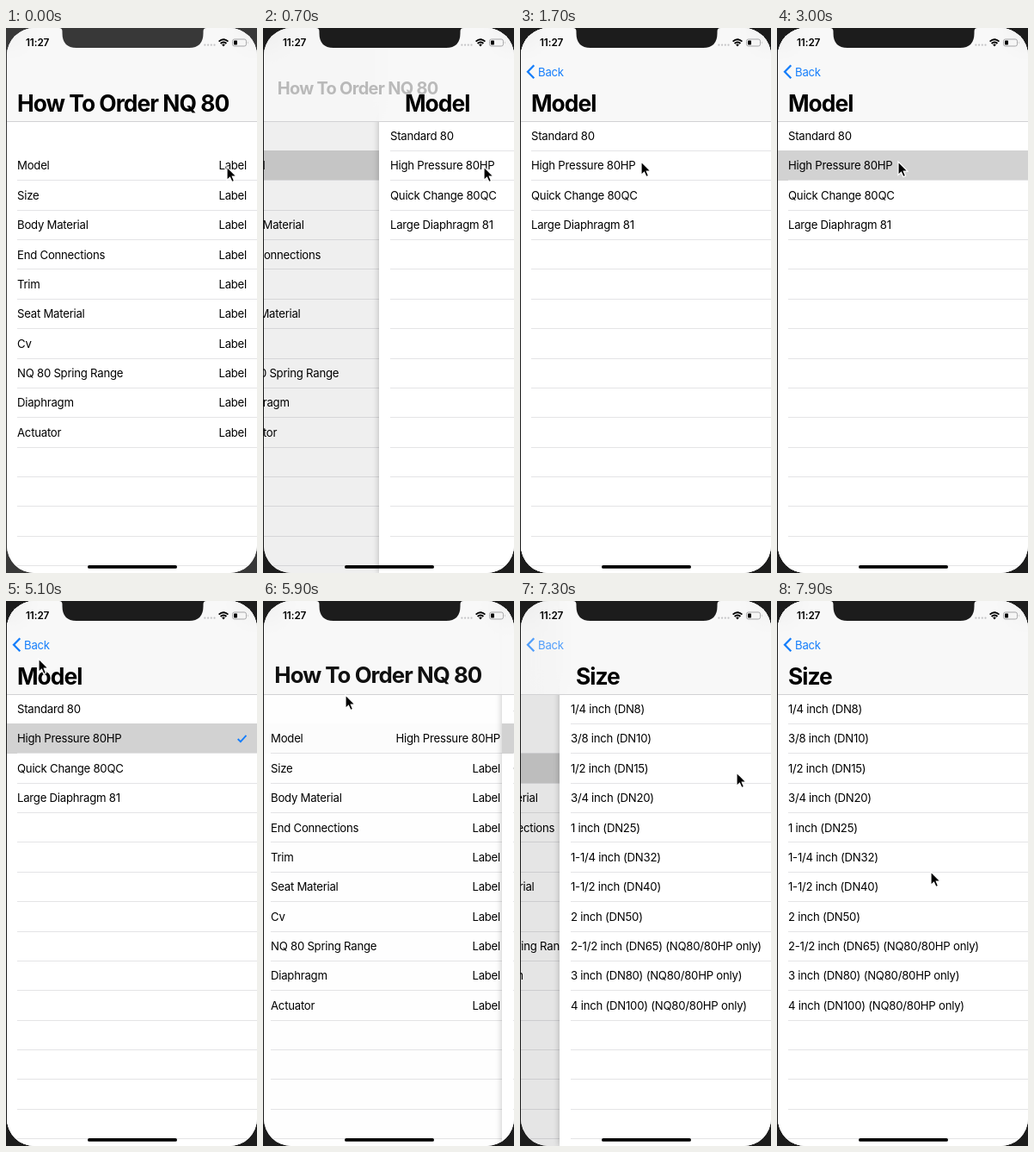
Recreate the animation shown at these times as an HTML page. Size 292 by 632 pixels, loop 8000 ms.

```html
<!DOCTYPE html>
<html lang="en">
<head>
<meta charset="utf-8">
<title>Order form</title>
<style>
  html, body { margin: 0; width: 100%; height: 100%; overflow: hidden; }
  body { position: relative; background: var(--bezel); color: #000;
    font: 13.2px/34.37px Inter, Roboto, sans-serif; letter-spacing: -.019em; white-space: nowrap; }
  div, span, svg { position: absolute; }
  #screen { left: 0; top: 0; width: 292px; height: 632px; background: #fff;
    clip-path: inset(0 0 0 1px round 32px); }
  .page { left: 0; top: 0; width: 292px; height: 632px; background: #fff; }
  #detail { box-shadow: 0 0 7px rgba(0, 0, 0, .25); }
  #shade { left: 0; top: 0; width: 292px; height: 632px; background: #000; }
  .row { left: 0; width: 292px; height: 34.37px; }
  .row::after { content: ""; position: absolute; left: 13px; right: 0; bottom: -.5px; height: 1px; background: #e4e4e6; }
  .row.gap::after { display: none; }
  .fill { left: 0; top: 0; width: 100%; height: 100%; background: #d2d2d2; opacity: 0; }
  .name { left: 13px; }
  .value { right: 12px; }
  #nav { left: 0; top: 0; width: 292px; height: 108px; background: rgba(247, 247, 247, .85);
    backdrop-filter: blur(14px); border-bottom: 1px solid #d2d2d4; }
  .title { left: 13px; top: 70px; font-size: 26.4px; font-weight: 700; letter-spacing: -.037em;
    transform-origin: 0 50%; }
  #back { left: 0; top: 34px; color: #157efb; }
  #back span { left: 21px; }
  #clock { left: 23px; top: 0; font-size: 11.8px; font-weight: 600; letter-spacing: -.01em; }
  #art, #cursor { left: 0; top: 0; overflow: visible; }
</style>
</head>
<body>
<div id="screen">
  <div class="page" id="main"></div>
  <div id="shade"></div>
  <div id="detail" class="page">
    <div class="page" id="model"></div>
    <div class="page" id="size"></div>
    <svg id="check" width="292" height="632" fill="none" stroke="#157efb" stroke-width="1.9">
      <path d="M269.7 160l3.2 3.1 6.6-7.2"/>
    </svg>
  </div>
  <div id="nav">
    <span class="title" id="mainTitle">How To Order NQ 80</span>
    <span class="title" id="detailTitle"></span>
    <div id="back">
      <svg width="20" height="34" fill="none" stroke="#157efb" stroke-width="2.3"><path d="M16.3 9.3L9 16.8l7.3 7.5"/></svg>
      <span>Back</span>
    </div>
    <span id="clock">11:27</span>
  </div>
</div>
<svg id="art" width="292" height="632">
  <path fill="var(--bezel)" d="M62 0Q65.5 0 65.5 4V6Q65.5 23 82 23H213Q229.5 23 229.5 6V4Q229.5 0 233 0Z"/>
  <path stroke="#c4c4c6" stroke-width="2.2" stroke-linecap="round" stroke-dasharray="0 3.7" d="M231.4 19.7h11.3"/>
  <g fill="none" stroke="#000" stroke-width="1.9">
    <path d="M247.6 15.6q5.4-4.6 10.8 0M249.6 17.9q3.4-2.8 6.8 0"/>
    <path fill="#000" stroke="none" d="M251.1 19.3q1.9-1.4 3.8 0L253 21.4z"/>
  </g>
  <rect x="263.5" y="13" width="16" height="8" rx="2.2" fill="none" stroke="#a6a6a8"/>
  <rect x="265" y="14.5" width="4" height="5" rx=".8"/>
  <path fill="#a6a6a8" d="M281 15.5q1.3 1.5 0 3z"/>
  <rect x="95" y="623" width="104" height="3.8" rx="1.9"/>
</svg>
<svg id="cursor" width="14" height="20">
  <path d="M0 0V15.4L3.5 12.2 5.9 17.6 8.6 16.4 6.3 11.1H11Z" stroke="#fff" stroke-width="1.2"/>
</svg>
<script>
const $ = id => document.getElementById(id);
const LOOP = 8000, W = 292, TOP = 108.1, ROW = 34.37;

function fillPage(id, names, gap, value) {
  for (let i = 0; i < 15; i++) {
    const row = document.createElement('div'), name = names[i - gap];
    row.className = i < gap ? 'row gap' : 'row';
    row.style.top = TOP + i * ROW + 'px';
    row.innerHTML = '<div class="fill"></div>' +
      (name ? `<span class="name">${name}</span><span class="value">${value}</span>` : '');
    $(id).append(row);
  }
}

fillPage('main', ['Model', 'Size', 'Body Material', 'End Connections', 'Trim', 'Seat Material',
  'Cv', 'NQ 80 Spring Range', 'Diaphragm', 'Actuator'], 1, 'Label');
fillPage('model', ['Standard 80', 'High Pressure 80HP', 'Quick Change 80QC', 'Large Diaphragm 81'], 0, '');
fillPage('size', ['1/4 inch (DN8)', '3/8 inch (DN10)', '1/2 inch (DN15)', '3/4 inch (DN20)',
  '1 inch (DN25)', '1-1/4 inch (DN32)', '1-1/2 inch (DN40)', '2 inch (DN50)',
  '2-1/2 inch (DN65) (NQ80/80HP only)', '3 inch (DN80) (NQ80/80HP only)',
  '4 inch (DN100) (NQ80/80HP only)'], 0, '');

// Pointer stops: time, x, y
const stops = [
  [0, 257, 161], [1300, 257, 161], [1700, 141, 155], [3000, 141, 155], [3300, 60, 92],
  [4700, 60, 92], [5100, 38, 67], [5400, 33, 47], [5700, 33, 47], [6200, 211, 222],
  [6400, 211, 222], [6700, 252, 199], [7400, 252, 199], [7700, 179, 314], [LOOP, 179, 314]
];

const clamp = v => Math.min(1, Math.max(0, v));
const show = (id, on) => $(id).style.visibility = on ? 'visible' : 'hidden';
const shift = (id, x, y = 0, scale = 1) =>
  $(id).style.transform = `translate(${x}px, ${y}px) scale(${scale})`;
const light = (id, i, alpha) => $(id).children[i].firstChild.style.opacity = alpha;

// Critically damped slide, 0 to 1
function slide(ms) {
  const s = Math.max(0, ms) * .015;
  return 1 - Math.exp(-s) * (1 + s);
}

function pointer(t) {
  const i = stops.findIndex(s => s[0] > t);
  const [t0, x0, y0] = stops[i - 1], [t1, x1, y1] = stops[i];
  const u = (t - t0) / (t1 - t0), e = u * u * (3 - 2 * u);
  return [Math.round(x0 + (x1 - x0) * e), Math.round(y0 + (y1 - y0) * e)];
}

function draw(t) {
  const pop = slide(t - 5580), p = clamp(slide(t - 580) - pop + slide(t - 7080));
  const sizing = t >= 6900, open = p > .001;

  document.body.style.setProperty('--bezel', t < 300 ? '#383838' : '#1c1c1c');
  shift('main', Math.round(-.305 * W * p));
  $('shade').style.opacity = .12 * p;
  shift('detail', Math.round(W * (1 - p)));
  show('detail', open);
  show('model', open && !sizing);
  show('size', open && sizing);
  show('check', open && !sizing && t >= 4000);

  light('main', 1, t >= 400 ? 1 - pop : 0);
  light('main', 2, sizing ? 1 : 0);
  light('model', 1, t >= 2400 ? 1 : 0);
  $('main').children[1].lastChild.textContent = t >= 5500 ? 'High Pressure 80HP' : 'Label';

  shift('mainTitle', 7 * p, -33 * p, 1 - .45 * p);
  $('mainTitle').style.opacity = clamp(1 - 1.4 * p);
  $('detailTitle').textContent = sizing ? 'Size' : 'Model';
  shift('detailTitle', Math.round(1.128 * W * (1 - p)));
  $('back').style.opacity = clamp((p - .55) / .4);
  shift('cursor', ...pointer(t));
}

// The screen updates ten times a second
const start = performance.now();
function tick() {
  const t = (performance.now() - start) % LOOP;
  draw(Math.floor((t + 10) / 100) * 100 % LOOP);
  requestAnimationFrame(tick);
}
tick();
</script>
</body>
</html>
```
